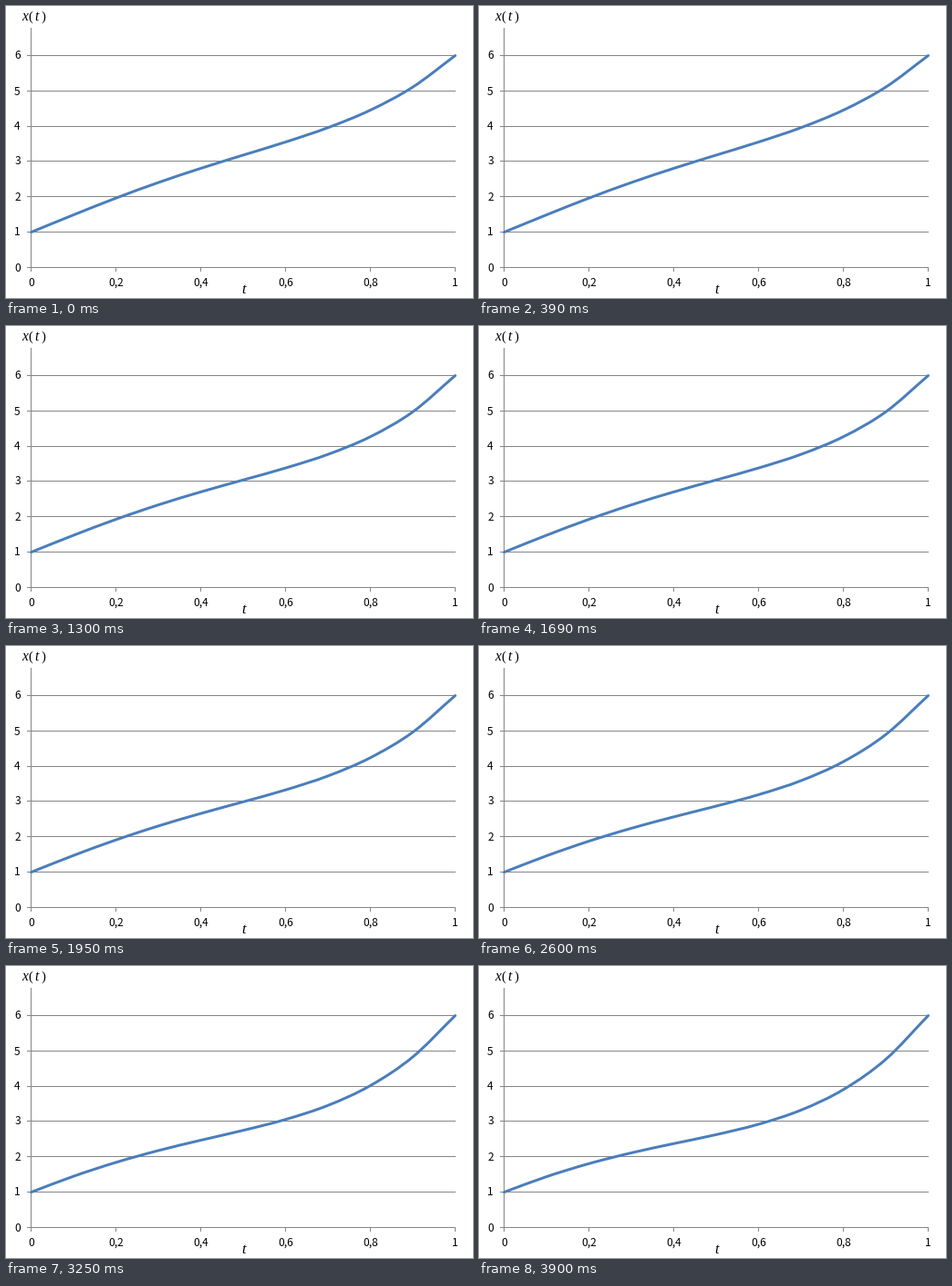
These frames come from a looping animation (512x321 px, 4.55 s). A matplotlib script:

```python
import matplotlib.pyplot as plt
import numpy as np
from matplotlib.animation import FuncAnimation
from matplotlib.patches import PathPatch
from matplotlib.path import Path

W, H, DPI = 512, 321, 100
LEFT, RIGHT, BASE, TOP = 27.5, 492.5, 287.5, 54.5
UNIT = (BASE - TOP) / 6
COUNT = 7
GREY, BLUE = "#868686", "#4a7ebb"
SANS, SERIF = "Noto Sans CJK JP", "Liberation Serif"


def px(size):
    return size * 72 / DPI


def line(xs, ys):
    ax.plot(xs, ys, color=GREY, lw=px(1), solid_capstyle="butt",
            snap=False, zorder=1)


def label(x, y, text, size, font, style="normal", align="center"):
    ax.text(x, y, text, fontsize=px(size), family=font, style=style,
            ha=align, va="baseline", color="black")


def solution(t, step):
    """Iterate of x(t) with x(0) = 1 and x(1) = 6."""
    sag = np.interp(step, [0, 3, 6], [0, 0.33, 1])
    bend = np.interp(step, [0, 2, 3, 6], [0, 1, 0.5, 0])
    q = 0.11 + 0.16 * sag + (4.1 * sag - 0.65) * t + 5.95 * t**2 + bend * t**4
    return 1 + 5 * t - t * (1 - t) * q


def smooth(step):
    """Bezier spline through eleven evenly spaced points."""
    t = np.linspace(0, 1, 11)
    pts = np.column_stack([LEFT + (RIGHT - LEFT) * t,
                           BASE - UNIT * solution(t, step)])
    slope = np.gradient(pts, axis=0) / 3
    verts, codes = [pts[0]], [Path.MOVETO]
    for i in range(len(pts) - 1):
        verts += [pts[i] + slope[i], pts[i + 1] - slope[i + 1], pts[i + 1]]
        codes += [Path.CURVE4] * 3
    return Path(verts, codes)


fig = plt.figure(figsize=(W / DPI, H / DPI), dpi=DPI, facecolor="white")
ax = fig.add_axes([0, 0, 1, 1])
ax.set_xlim(0, W)
ax.set_ylim(H, 0)
ax.axis("off")

for v in range(7):
    y = round(BASE - 0.5 - UNIT * v) + 0.5
    line([23, 493], [y, y])
    label(12.5, y + 4, str(v), 12, SANS)

line([LEFT, LEFT], [24, 292])
for i in range(6):
    x = round(LEFT - 0.5 + (RIGHT - LEFT) * i / 5) + 0.5
    line([x, x], [287, 292])
    label(x, 308, f"{i / 5:g}".replace(".", ","), 12, SANS)

label(17, 16, "x", 15.5, SERIF, "italic", "left")
label(24.5, 16, "(", 14.5, SERIF, align="left")
label(31.5, 16, "t", 15.5, SERIF, "italic", "left")
label(38, 16, ")", 14.5, SERIF, align="left")
label(261, 316, "t", 16, SERIF, "italic")

curve = PathPatch(smooth(0), fill=False, edgecolor=BLUE, lw=px(3),
                  capstyle="round", joinstyle="round", zorder=3)
ax.add_patch(curve)


def draw(step):
    curve.set_path(smooth(step))
    return (curve,)


anim = FuncAnimation(fig, draw, frames=COUNT, interval=650,
                     repeat=True, repeat_delay=0)
plt.show()
```
